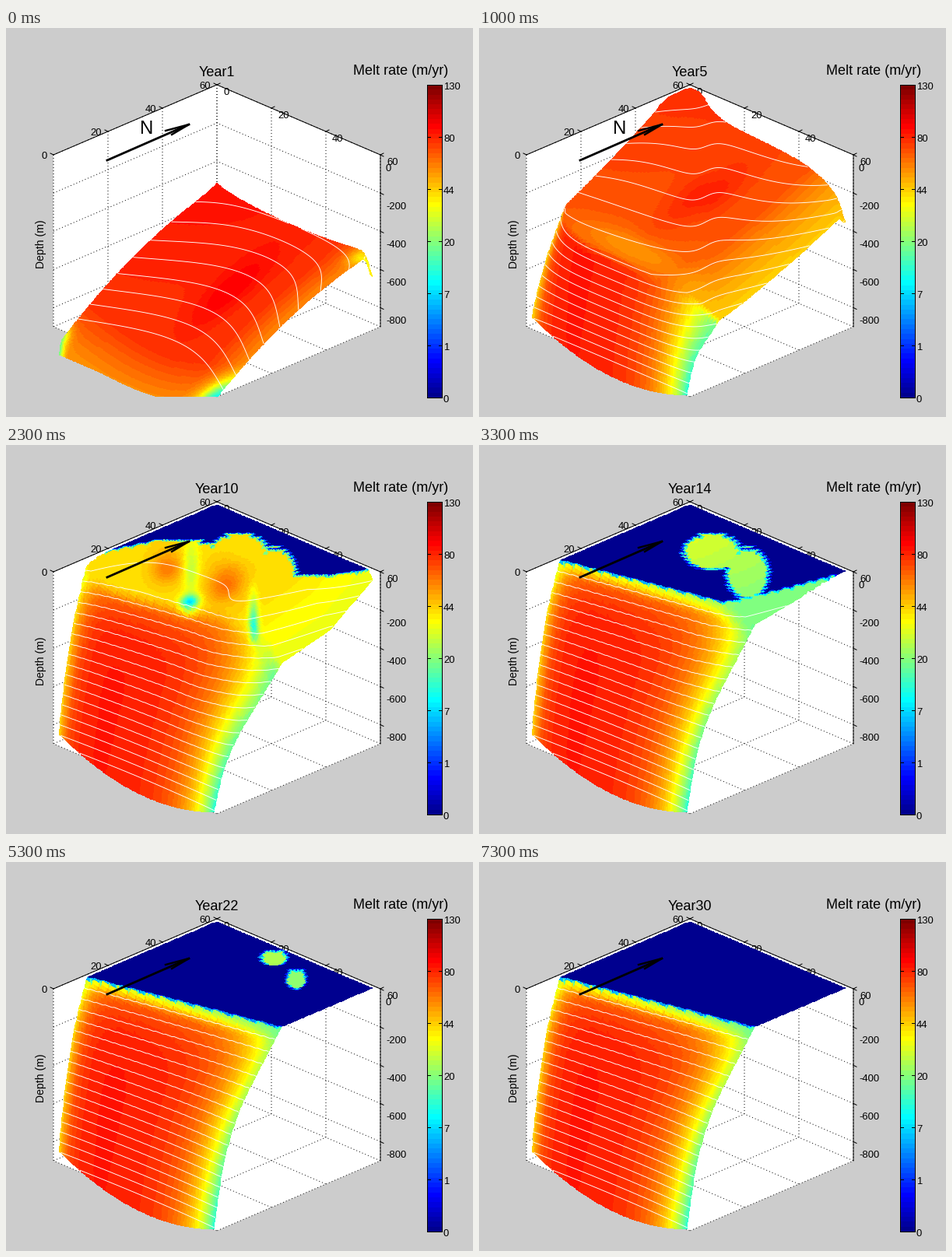
A matplotlib script for the animation above (7.5 s loop, 600x500 px).

```python
import numpy as np
import matplotlib.pyplot as plt
from matplotlib.animation import FuncAnimation
from matplotlib.colors import ListedColormap
from matplotlib.patches import Polygon, Rectangle

W, H, DPI = 600, 500, 100
PT = 72 / DPI
FONT = "Liberation Sans"
LEVELS = np.arange(1, 19) / 18          # every 50 m of 900 m
N = 130


def project(u, v, depth=0):
    """Plan position (0..1 from the back corner) and depth (0..1) to pixels."""
    return 271 + 210 * (u - v), 73 + 90 * (u + v) + 221 * depth


u_axis = np.linspace(.02, .97, N)
v_axis = .02 + .967 * (1 - (1 - np.linspace(0, 1, N)) ** 1.4)
U, V = np.meshgrid(u_axis, v_axis)
PX, PY = project(U, V)
SAW = (22 * (U + V)) % 1


def left_lip(width):
    return np.exp(-U / width)


def right_lip(width):
    return np.exp(-(1 - U) / width)


def ellipse(cx, cy, rx, ry):
    return ((PX - cx) / rx) ** 2 + ((PY - cy) / ry) ** 2


def spot(cx, cy, rx, ry):
    return np.exp(-ellipse(cx, cy, rx, ry))


def plan_spot(u, v, ru, rv):
    return np.exp(-((U - u) / ru) ** 2 - ((V - v) / rv) ** 2)


# Depth of the ice base in each stage; negative values are open water.
deep_shelf = (.57 + .2 * V + .33 * V ** 2 - .06 * U * V - .04 * np.exp(-(U + V) / .06)
              + .13 * np.sin(np.pi * U) * np.tanh(5 * V + .2))
thin_shelf = (.07 + .03 * U + .52 * V - .13 * V ** 2 + .035 * np.tanh((U - V - .1) / .08)
              + .25 * right_lip(.12) - .18 * (1 - 1.4 * V) * left_lip(.08))
opening = (np.minimum(.25 * (V - .28), .7 * (V - .28)) - .13 * left_lip(.08)
           + .32 * right_lip(.1) - .035 * np.exp(-((U - .7) / .1) ** 2))
remnant = .16 * V - .2 + .22 * right_lip(.25)
STAGES = np.stack([deep_shelf, thin_shelf, opening, remnant, remnant - .12])
STAGE_YEARS = [1, 5, 10, 14, 20]

# Raised rims and rifts seen while the shelf breaks open.
RIDGES = (.1 * spot(207, 145, 20, 14) + .11 * spot(283, 168, 24, 20)
          - .3 * spot(236, 180, 12, 7) - .28 * spot(318, 210, 6, 22)
          - .1 * spot(238, 148, 10, 26))


def patch(year, start, drift):
    """Last thin-ice patch: drifts and shrinks after year 14."""
    s = max(year - 14, 0) / 8
    cx, cy, rx, ry = np.array(start) + s * np.array(drift)
    return .03 * (1 - ellipse(cx, cy, max(rx, .1), max(ry, .1)))


def ice_base(year):
    """Depth and melt colour index for one year."""
    at = lambda years, values: np.interp(year, years, values)
    early, late = at([1, 5], [1, 0]), at([5, 10], [0, 1])

    weights = [at(STAGE_YEARS, row) for row in np.eye(len(STAGES))]
    base = np.tensordot(weights, STAGES, 1)
    base = np.maximum(base, patch(year, (300, 137, 42, 26), (45, -14, -22, -15)))
    base = np.maximum(base, patch(year, (345, 165, 31, 37), (28, -15, -17, -22)))
    base = np.maximum(base - .012 * SAW * (base < .04), 0)
    base += at([1, 8], [.2, 0]) * plan_spot(1, .02, .05, .025)

    # Steep cliff that drops to the grounding line at the front.
    young = .93 + .04 * early - .18 * (1 - early) * (2 * U - 1) ** 4
    old = .815 - .25 * U + .009 * ((22 * U) % 1)
    edge = young + (old - young) * late
    w = np.clip((V - edge) / (.987 - edge), 0, 1)
    foot = 1.16 * early + (1 - early) * (1.09 - .5 * (U - .57) ** 2)
    depth = base + (foot - base) * (.58 * w + .42 * w ** (3 + 4 * U))

    shelf = at([1, 5, 10, 14, 18], [.81, .775, .65, .55, .53])
    shelf = shelf - at([1, 5, 14], [.35, .5, 0]) * np.maximum(U - .75, 0)
    shelf += .05 * (1 - late) * ((1 - V) * (1 - U) + plan_spot(.5, .42, .1, .25))
    shelf += at([10, 14], [0, .14]) * (.5 - U)
    shelf -= at([1, 5, 8], [0, .06, 0]) * plan_spot(.5, .85, .3, .08)
    shelf -= early * (.08 * np.clip((V - .8) / .18, 0, 1)
                      + .12 * plan_spot(.95, .05, .07, .07)
                      + .3 * plan_spot(.97, .987, .1, .1)
                      + .35 * plan_spot(0, .987, .04, .06))
    shelf += at([6, 10, 13], [0, 1, 0]) * RIDGES
    shelf -= at([15, 18, 21], [0, .3, 0]) * spot(345, 126, 4, 10)

    cliff = (.85 - .3 * left_lip(.05) - (.3 + .25 * depth) * right_lip(.15)
             - .13 * late * (1 - w) ** 5)
    blend = np.clip(w / .12, 0, 1) * at([1, 3], [0, 1])
    color = shelf + (cliff - shelf) * blend
    return depth, np.where(depth > 0, color, 0)


steps = np.arange(1, 65)[:, None] / 64
JET = ListedColormap(np.clip(1.5 - np.abs(4 * steps - [3, 2, 1]), 0, 1))

fig = plt.figure(figsize=(W / DPI, H / DPI), dpi=DPI, facecolor="#cccccc")
ax = fig.add_axes([0, 0, 1, 1])
ax.axis("off")


def line(points, width=1, style="-", z=1):
    x, y = zip(*points)
    ax.plot(x, y, color="k", lw=width * PT, ls=style, zorder=z, solid_joinstyle="miter")


def label(x, y, text, size=13, ha="left", va="center_baseline", **kw):
    return ax.text(x, y, text, fontsize=size * PT, family=FONT, ha=ha, va=va, zorder=3, **kw)


def draw_box():
    corners = [(0, 1, 0), (0, 0, 0), (1, 0, 0), (1, 0, 1), (1, 1, 1), (0, 1, 1)]
    ax.add_patch(Polygon([project(*c) for c in corners], fc="w", ec="none", zorder=0))

    def grid(*points):
        line([project(*p) for p in points], style=(0, (1, 3)))

    for k in range(4):
        f = k / 3
        grid((0, f, 0), (0, f, 1), (1, f, 1))
        grid((f, 0, 0), (f, 0, 1), (f, 1, 1))
        x, y = project(0, f)
        line([(x, y), (x - 4, y - 2)])
        label(x - 8, y, str(60 - 20 * k), ha="right")
        x, y = project(f, 0)
        line([(x, y), (x + 4, y - 2)])
        label(x + 8, y + 9, str(20 * k))
    for k in range(5):
        d = 200 * k / 900
        grid((0, 1, d), (0, 0, d), (1, 0, d))
        x, y = project(1, 0, d)
        line([(x, y), (x + 4, y + 2)])
        label(x + 7, y + 16.5, str(-200 * k))
    line([project(0, 1), project(0, 0), project(1, 0), project(1, 0, 1)])
    label(45, 278, "Depth (m)", 14, ha="center", va="center", rotation=90)


def draw_colorbar():
    ax.imshow(np.arange(64)[::-1, None], cmap=JET, extent=(541, 560, 475, 73),
              aspect="auto", interpolation="nearest", zorder=2)
    ax.add_patch(Rectangle((541, 73), 19, 402, fill=False, ec="k", lw=PT, zorder=3))
    for k in range(7):
        y = 475 - 67 * k
        line([(541, y), (545, y)], z=3)
        line([(556, y), (560, y)], z=3)
        label(562, y + 1.5, f"{130 * (k / 6) ** 2.67:.0f}")
    label(507, 54, "Melt rate (m/yr)", 18, ha="center")


def draw_arrow():
    line([(130, 170), (235, 124)], 2.8, z=7)
    line([(205, 132), (235, 124), (213, 137)], 2.4, z=7)
    label(181, 127, "N", 24, ha="center")


draw_box()
draw_colorbar()
draw_arrow()
ax.set(xlim=(0, W), ylim=(H, 0))
ax.set_autoscale_on(False)
title = label(271, 56, "", 18, ha="center")
window = Rectangle((60, 70), 422, 404, transform=ax.transData)
drawn = []


def update(frame):
    year = 1 + frame // 5 * 2 + (frame % 5 >= 3)
    while drawn:
        drawn.pop().remove()
    depth, color = ice_base(year)
    x, y = project(U, V, depth)
    cells = (color[1:, 1:] + color[1:, :-1] + color[:-1, 1:] + color[:-1, :-1]) / 4
    mesh = ax.pcolormesh(x, y, cells, cmap=JET, vmin=0, vmax=1, zorder=4)

    # Contours only where the surface faces the viewer.
    dv, du = np.gradient(depth, v_axis, u_axis)
    facing = np.ma.masked_where(du + dv < -.81, depth)
    lines = ax.contour(x, y, facing, LEVELS, colors="w", linewidths=.9 * PT, zorder=5)
    for artist in (mesh, lines):
        artist.set_clip_path(window)
        drawn.append(artist)
    title.set_text(f"Year{year}")
    return drawn


anim = FuncAnimation(fig, update, frames=75, interval=100, repeat=True, repeat_delay=0)
plt.show()
```
